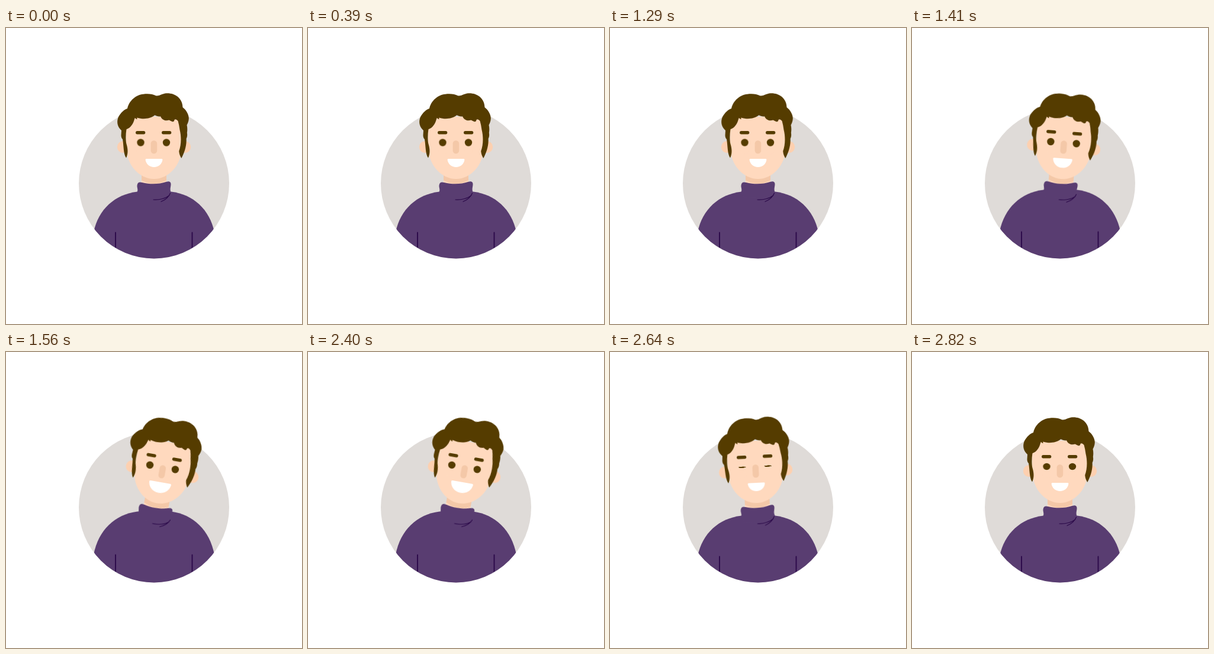
Recreate the animation shown at these times as an HTML page. Size 500 px wide and 500 px high, loop 3630 ms.

```html
<!DOCTYPE html>
<html lang="en">
<head>
<meta charset="utf-8">
<title>Laughing avatar</title>
<style>
  html, body { margin: 0; width: 100%; height: 100%; overflow: hidden; background: #fff; }
  svg { display: block; width: 100%; height: 100%; }

  .skin { fill: #ffd9be; }
  .ear { fill: #fdd0b0; }
  .shade { fill: #f4c8a8; }
  .hair { fill: #553c00; }
  .brow { fill: none; stroke: #553c00; stroke-width: 5.4; stroke-linecap: round; }
  .knit { fill: #593d71; }
  .seam { fill: none; stroke: #2c0a4a; stroke-width: 1.9; stroke-linecap: round; }
  .fold { stroke-width: 1.2; }

  .head, .body, .mouth, .brows, .lid, .eye {
    animation: 3630ms linear infinite;
  }
  .head { transform-origin: 250px 281px; animation-name: tilt; }
  .body { transform-origin: 250px 390px; animation-name: shrug; }
  .mouth { transform-origin: 250px 228px; animation-name: grin; }
  .eye { transform-origin: 0 0; animation-name: blink; }
  .lid { animation-name: squint; }

  @keyframes tilt {
    0%, 35.26% { transform: rotate(0deg); animation-timing-function: ease-in-out; }
    42.98%, 65.84% { transform: rotate(10deg); animation-timing-function: ease-in-out; }
    72.73% { transform: rotate(-2.75deg); animation-timing-function: ease-in-out; }
    77.69%, 100% { transform: rotate(0deg); }
  }
  @keyframes shrug {
    0%, 35.26% { transform: scaleY(1); animation-timing-function: ease-in-out; }
    42.98%, 65.84% { transform: scaleY(1.062); animation-timing-function: ease-in-out; }
    72.4%, 100% { transform: scaleY(1); }
  }
  @keyframes grin {
    0%, 35.26% { transform: scale(1); animation-timing-function: ease-in-out; }
    42.98%, 65.84% { transform: scale(1.3); animation-timing-function: ease-in-out; }
    72.4%, 100% { transform: scale(1); }
  }
  @keyframes squint {
    0%, 35.26% { transform: translateY(14px); animation-timing-function: ease-in-out; }
    42.98%, 65.84% { transform: translateY(5.5px); animation-timing-function: ease-in-out; }
    71.63%, 100% { transform: translateY(14px); }
  }
  @keyframes blink {
    0%, 10.19% { transform: scaleY(1); animation-timing-function: ease-in-out; }
    13.22% { transform: scaleY(.1); animation-timing-function: ease-in-out; }
    15.7%, 100% { transform: scaleY(1); }
  }
</style>
</head>
<body>
<svg viewBox="0 0 500 500">
  <defs>
    <clipPath id="disc"><circle cx="250" cy="262.5" r="127"/></clipPath>
    <clipPath id="throat"><path d="M229 235H271V275H229Z"/></clipPath>
    <path id="face" d="M203 150H297V200A47 55 0 0 1 203 200Z"/>
    <g id="look">
      <circle class="eye hair" r="6.2"/>
      <ellipse class="lid skin" rx="7" ry="6"/>
    </g>
  </defs>

  <circle cx="250" cy="262.5" r="127" fill="#dfdbd8"/>

  <g clip-path="url(#disc)">
    <g class="body">
      <path class="knit" d="M148 345C156 306 184 281 222 276.5H279C316 281 344 306 352 345V400H148Z"/>
      <path class="seam" d="M185 345.5V392M314.5 345.5V392"/>
    </g>
  </g>

  <g class="head">
    <path class="skin" d="M229 235H271V272H229Z"/>
    <g clip-path="url(#throat)"><use href="#face" class="shade" y="8"/></g>

    <path class="knit" d="M221 278C224 273 221 270 221.5 266C222 261 225 259.5 230 261
      C243 264.3 258 264.3 271 259.8C276 258 279 260 278.5 265C278 270 276.5 273 279 278L276 287H226Z"/>
    <path class="seam fold" d="M249 290C259 290.6 270 288 276 282.5M262 293.3C269 290.5 275 285 277.5 279"/>

    <ellipse class="ear" cx="197.5" cy="201" rx="9.7" ry="10"/>
    <ellipse class="ear" cx="302.5" cy="201" rx="9.7" ry="10"/>
    <use href="#face" class="skin"/>

    <path class="hair" d="M203 219.5C198 212 199 199 197 188C193 184 195 178 195 173
      C187 166 187 157 190 150C194 143 199 138 205 136C208 123 219 113 232 111.8
      C241 110.6 248 112 253 114.3C259 115.5 263 111 271 110.3C285 109.6 298 118 298.5 134
      C304 138 309 146 308.8 153C308.5 158 307 161 305.5 164C306.5 168 306.5 173 305.8 177
      C306.5 181 306 184 304.6 187C305.5 199 301 211 296.3 220C294 216 292.6 213 292.2 208
      C296 198 296.5 184 293.5 172Q292.5 164 290.5 157Q287 153 284.5 155Q284 159 280.5 158
      Q277.5 156.5 275.5 155.5C268 158 263 154 261 149.2Q256 150 251.3 147.3
      C243 154 231 154.5 221.3 151.5L221.5 154.2Q218.8 153.5 217.8 151.8L216.8 154.5
      C215 162 210 169 203.5 171C202 180 202 190 203.5 196C206 204 206.5 212 203 219.5Z"/>

    <path class="brow" d="M221.7 176.7H232.6M265.7 176.7H276.6"/>
    <use href="#look" x="227.5" y="193.5"/>
    <use href="#look" x="271" y="193.5"/>
    <rect class="shade" x="244.6" y="190" width="10.6" height="22.2" rx="5.3"/>
    <path class="mouth" fill="#fff" d="M237 221H263Q264.5 221 264.4 222.5C263.5 230 257.5 235 250 235
      C242.5 235 236.5 230 235.6 222.5Q235.5 221 237 221Z"/>
  </g>
</svg>
</body>
</html>
```
